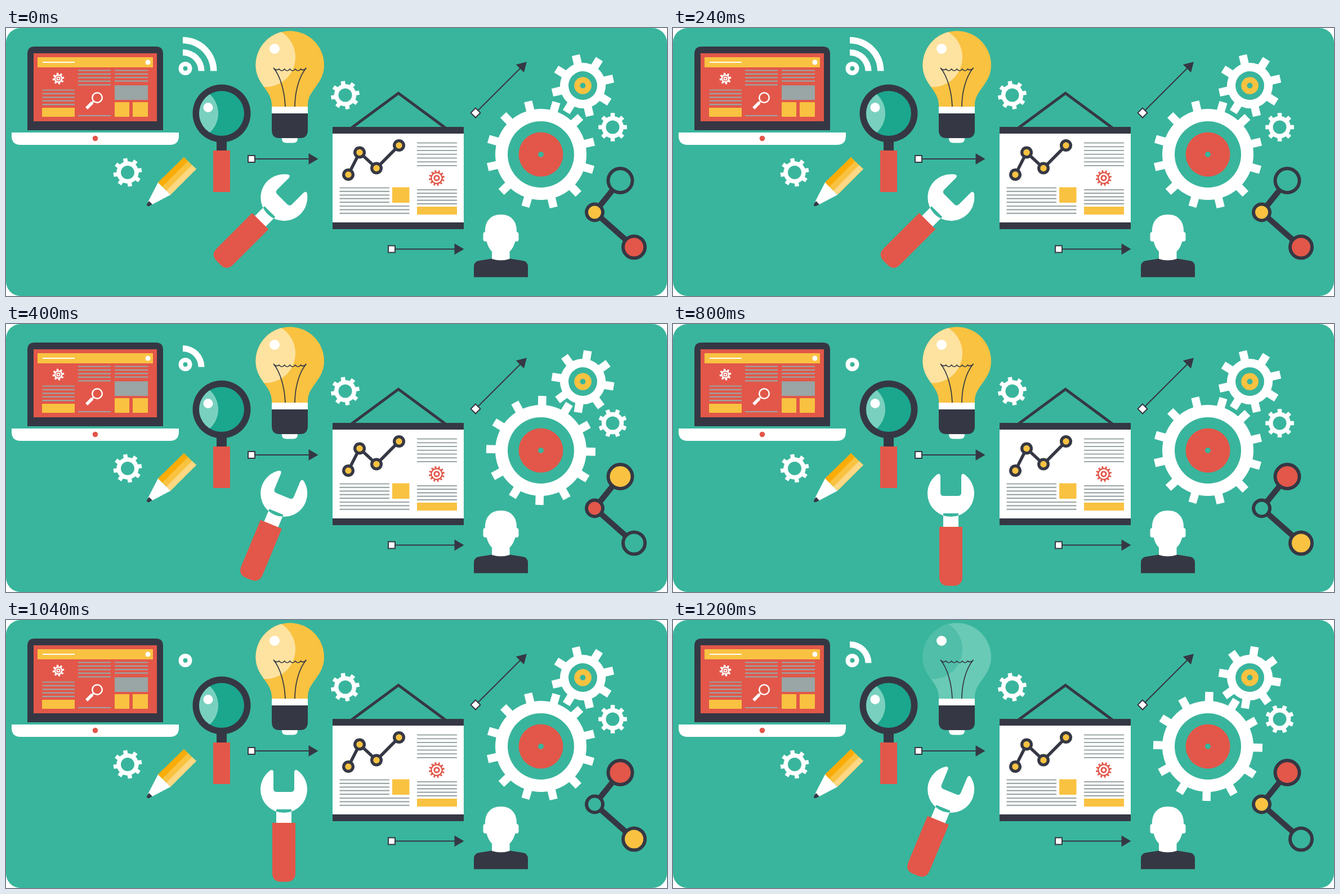
An HTML page that plays this animation: 1174x477 px, repeating every 1600 ms.

```html
<!DOCTYPE html>
<html lang="en">
<head>
<meta charset="utf-8">
<title>Ideas and tools</title>
<style>
  html, body { margin: 0; width: 100%; height: 100%; overflow: hidden; background: #fff; }
  svg { display: block; width: 100%; height: 100%; }
  .bg { fill: #39b59d; }
  .dark { fill: #353844; }
  .red { fill: #e25749; }
  .yellow { fill: #f9c241; }
  .white { fill: #fff; }
  .grey { fill: #9aa5a5; }
  .line { fill: none; stroke: #353844; }
  .text { fill: none; stroke: #9aa5a5; stroke-width: 2.2; }
</style>
</head>
<body>
<svg viewBox="0 0 1174 477">
  <defs>
    <path id="bulbShape" d="M472 140V137C472 110 443.500 100 443.500 66A60.750 60.750 0 0 1 565 66C565 100 536 110 536 137V140Z"/>
    <clipPath id="bulbClip"><use href="#bulbShape"/></clipPath>
    <clipPath id="lensClip"><circle cx="383" cy="152" r="40"/></clipPath>
  </defs>
  <rect class="bg" width="1174" height="477" rx="26"/>

  <g id="laptop">
    <path class="dark" d="M38 182V46Q38 33 51 33H266Q279 33 279 46V182Z"/>
    <path class="red" d="M49 45H268V166H49Z"/>
    <path class="yellow" d="M56 52H261V70H56ZM64 142H122V158H64ZM193 132H219V158H193ZM225 132H252V158H225Z"/>
    <path d="M65 61H122" stroke="#fff" stroke-width="2.200"/>
    <circle class="white" cx="252" cy="61" r="4.500"/>
    <path class="grey" d="M193 102H252V128H193Z"/>
    <circle cx="162" cy="124" r="8.800" fill="none" stroke="#fff" stroke-width="2.500"/>
    <path d="M155.500 130.500L152 134" stroke="#fff" stroke-width="3"/>
    <path d="M153.500 132.500L143 143" stroke="#fff" stroke-width="5.500"/>
    <path class="white" d="M10 186H307V192Q307 208 291 208H26Q10 208 10 192Z"/>
    <circle class="red" cx="158.500" cy="196.500" r="4.800"/>
  </g>

  <g id="signal" class="white">
    <circle cx="318.500" cy="72" r="12"/>
    <circle class="bg" cx="318.500" cy="72" r="4"/>
    <path id="nearWave" d="M314 38A38.500 38.500 0 0 1 352.500 76.500H341.500A27.500 27.500 0 0 0 314 49Z"/>
    <path id="farWave" d="M314 16A60.500 60.500 0 0 1 374.500 76.500H363A49 49 0 0 0 314 27.500Z"/>
  </g>

  <g id="magnifier">
    <circle class="dark" cx="383" cy="152" r="51.500"/>
    <circle cx="383" cy="152" r="40" fill="#1ba68e"/>
    <circle cx="331" cy="152" r="46" fill="#79d0bf" clip-path="url(#lensClip)"/>
    <circle class="white" cx="359" cy="141.500" r="8.500"/>
    <path class="dark" d="M374 200H392V218H374Z"/>
    <path class="red" d="M368 218H398V292H368Z"/>
  </g>

  <g id="bulb">
    <use id="glass" href="#bulbShape"/>
    <circle id="shine" cx="461" cy="52" r="53" clip-path="url(#bulbClip)"/>
    <circle class="white" cx="477" cy="37" r="9"/>
    <path class="line" stroke-width="1.700" d="M496 140C495 115 488 86 475 71Q480 77 485 73q4.800 6 9.600 0q4.800 6 9.600 0q4.800 6 9.600 0q4.800 6 9.600 0Q528 77 533.500 71C520 86 513 115 513 140"/>
    <path class="white" d="M472 140H536V152H472ZM490 195H518V197Q518 204.500 510 204.500H498Q490 204.500 490 197Z"/>
    <path class="dark" d="M472 152H536V182Q536 196 522 196H486Q472 196 472 182Z"/>
  </g>

  <g id="pencil">
    <path class="yellow" d="M316 230L338 251L292 297L270 275Z"/>
    <path fill="#fbac06" d="M316 230L323 237L277 283L270 275Z"/>
    <path fill="#fcd884" d="M330.500 244L338 251L292 297L284.500 290Z"/>
    <path class="white" d="M270 275L292 297L258 315L252 310Z"/>
    <path class="dark" d="M254 308L260 314L254 317Q249 318 250.500 313Z"/>
  </g>

  <g id="wrench">
    <path class="white" d="M-18.500 -31Q-19.500 -39 -27 -32A41.500 41.500 0 1 0 27 -32Q19.500 -39 18.500 -31V-2q0 6 -6 6H-12.500q-6 0 -6 -6ZM-13.500 35H13.500V60H-13.500Z"/>
    <path class="red" d="M-20.500 59H20.500V148Q20.500 164 4.500 164H-4.500Q-20.500 164 -20.500 148Z"/>
  </g>

  <g id="board">
    <path class="line" stroke-width="5" d="M612 179L697 116L782 179"/>
    <path class="white" d="M580 187H813V347H580Z"/>
    <path class="dark" d="M580 176H813V188H580ZM580 346H813V358H580Z"/>
    <path class="yellow" d="M686 283.500H716.500V311H686ZM730 318H801V332H730Z"/>
    <path class="line" stroke-width="5.500" d="M608 261L628 221.500L658 249.500L698 209"/>
  </g>

  <g id="person">
    <path class="dark" d="M831 443.500V425Q831 415 841 414L863 410.500H895L917 414Q927 415 927 425V443.500Z"/>
    <path class="white" d="M851 364C850 345 860 332 879 332C898 332 908 345 907 364Q905 388 894.500 398V411Q879 416 863 411V398Q853 388 851 364Z"/>
    <rect class="white" x="847.500" y="363" width="9" height="17" rx="4"/>
    <rect class="white" x="901.500" y="363" width="9" height="17" rx="4"/>
  </g>

  <path class="line" stroke-width="10" d="M1091 271.500L1045.500 328L1115.500 390"/>
</svg>
<script>
const STEP = 400;
const RED = '#e25749', YELLOW = '#f9c241', TEAL = '#39b59d', DARK = '#353844';
const svg = document.querySelector('svg');
const byId = id => document.getElementById(id);

function add(tag, attributes, parent = svg) {
  const node = document.createElementNS('http://www.w3.org/2000/svg', tag);
  for (const name in attributes) node.setAttribute(name, attributes[name]);
  return parent.appendChild(node);
}

// Rings are [radius, fill] pairs, painted over the body from large to small.
function gear(x, y, { outer, body, teeth, width, fill = '#fff', turn = 0, rings }, parent) {
  const group = add('g', { transform: `translate(${x} ${y})` }, parent);
  const wheel = add('g', { transform: `rotate(${turn})`, fill }, group);
  add('circle', { r: body }, wheel);
  for (let i = 0; i < teeth; i++)
    add('rect', { x: -width / 2, y: -outer, width, height: outer - body + 2, transform: `rotate(${i * 360 / teeth})` }, wheel);
  for (const [r, fill] of rings) add('circle', { r, fill }, group);
  return wheel;
}

function arrow(x, y, length, angle = 0) {
  const group = add('g', { transform: `translate(${x} ${y}) rotate(${angle})` });
  add('path', { class: 'line', 'stroke-width': 2, d: `M0 0H${length - 14}` }, group);
  add('path', { class: 'dark', d: `M${length} 0l-17 -10v20Z` }, group);
  add('rect', { x: -6, y: -6, width: 12, height: 12, fill: '#fff', stroke: DARK, 'stroke-width': 2 }, group);
}

function textLines(parent, x1, x2, top, count, gap) {
  for (let i = 0; i < count; i++)
    add('path', { class: 'text', d: `M${x1} ${top + i * gap}H${x2}` }, byId(parent));
}

function joint(cx, cy, r) {
  return add('circle', { cx, cy, r, stroke: DARK, 'stroke-width': 6 });
}

textLines('laptop', 64.5, 122, 110.5, 5, 6.4);
textLines('laptop', 128, 186, 75.5, 5, 6.4);
textLines('laptop', 128, 186, 156, 1, 0);
textLines('laptop', 193, 252, 75.5, 4, 6.3);
textLines('board', 730, 801, 204.5, 7, 6.75);
textLines('board', 730, 801, 288, 5, 6.2);
textLines('board', 592.5, 681, 284.5, 5, 6.4);
textLines('board', 592.5, 716.5, 317, 3, 6.4);

for (const [cx, cy] of [[608, 261], [628, 221.5], [658, 249.5], [698, 209]]) {
  add('circle', { cx, cy, r: 11, class: 'dark' }, byId('board'));
  add('circle', { cx, cy, r: 5.7, class: 'yellow' }, byId('board'));
}

gear(93, 90, { outer: 10.3, body: 7.3, teeth: 8, width: 3.4, turn: -10,
  rings: [[5, RED], [3.6, '#fff'], [1.6, RED]] }, byId('laptop'));
gear(765, 267, { outer: 14, body: 10.8, teeth: 12, width: 2.8, fill: RED, turn: -10,
  rings: [[8.5, '#fff'], [5.6, RED], [2.7, '#fff']] }, byId('board'));

const smallGear = { outer: 25.3, body: 19.7, teeth: 8, width: 7.5, turn: -10, rings: [[12, TEAL]] };
gear(216, 257, smallGear);
gear(602.5, 119.5, smallGear);
const sideWheel = gear(1077.5, 176.5, smallGear);
const bigWheel = gear(950, 225, { outer: 97, body: 81, teeth: 12, width: 14.5,
  rings: [[59, TEAL], [39.5, RED], [5, TEAL]] });
const topWheel = gear(1024.5, 102.5, { outer: 55.5, body: 40.5, teeth: 8, width: 14.5,
  rings: [[25.5, TEAL], [15.3, YELLOW], [5, TEAL]] });

arrow(436, 233, 118.5);
arrow(685, 393.5, 128.5);
arrow(834, 151, 128.5, -45);

const joints = [joint(1091, 271.5, 21.5), joint(1045.5, 328, 14.5), joint(1115.5, 390, 19.5)];
const jointFills = [[TEAL, YELLOW, RED], [YELLOW, RED, TEAL], [RED, TEAL, YELLOW], [RED, YELLOW, TEAL]];

const rotate = (node, angle) => node.setAttribute('transform', `rotate(${angle})`);

function render(now) {
  const pose = Math.floor(now / STEP) % 4;
  const swing = Math.abs(pose - 2);   // 2, 1, 0, 1
  const odd = pose % 2;
  const lit = pose < 3;

  byId('nearWave').style.display = swing > 0 ? '' : 'none';
  byId('farWave').style.display = swing > 1 ? '' : 'none';
  byId('wrench').setAttribute('transform', `translate(493.5 302) rotate(${swing * 22.5})`);
  byId('glass').style.fill = lit ? YELLOW : '#69cab6';
  byId('shine').style.fill = lit ? '#fee2a0' : '#50bea8';

  rotate(bigWheel, odd ? 1.5 : -13.5);
  rotate(topWheel, odd ? 9 : -13);
  rotate(sideWheel, odd ? 22.5 : 0);
  joints.forEach((node, i) => node.setAttribute('fill', jointFills[pose][i]));
  requestAnimationFrame(tick);
}

const start = performance.now();
function tick() { render(performance.now() - start); }
tick();
</script>
</body>
</html>
```
